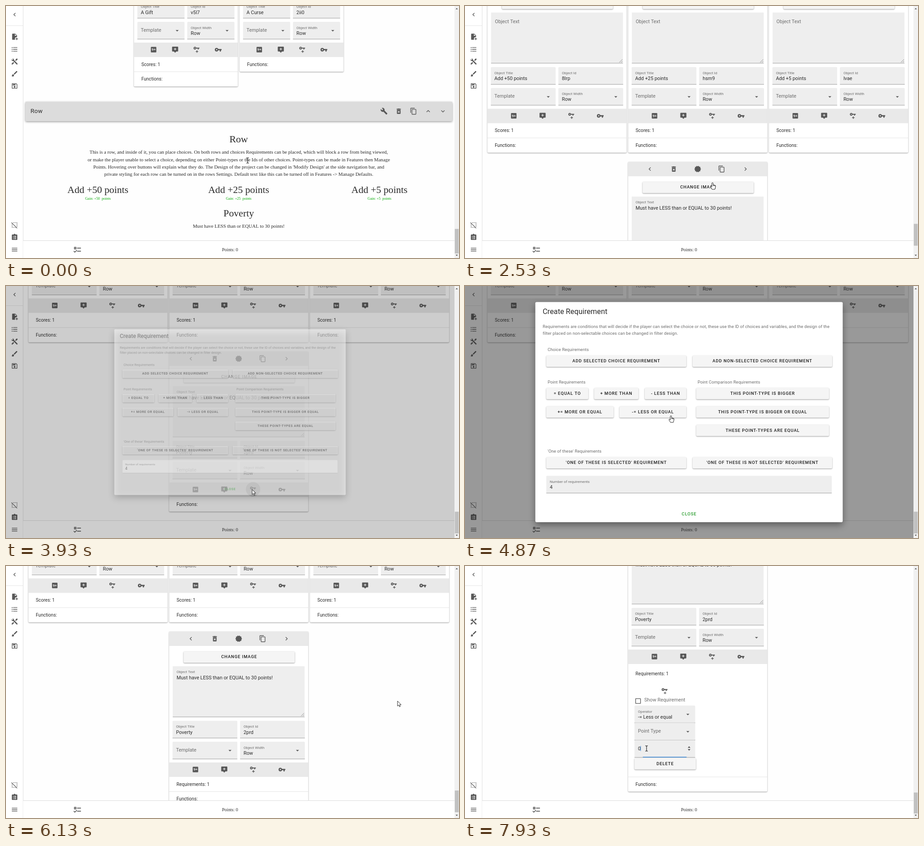
An HTML page with a canvas for the animation above (8 s loop, 1003 by 558 pixels).

```html
<!DOCTYPE html>
<html lang="en">
<head>
<meta charset="utf-8">
<title>Row editor</title>
<style>
html, body { margin: 0; width: 100%; height: 100%; overflow: hidden; background: #fff; }
canvas { display: block; width: 1003px; height: 558px; }
</style>
</head>
<body>
<canvas id="stage"></canvas>
<script>
const W = 1003, H = 558, LOOP = 8000;
const canvas = document.getElementById('stage');
const ctx = canvas.getContext('2d');
const dpr = window.devicePixelRatio || 1;
canvas.width = W * dpr;
canvas.height = H * dpr;

const SANS = 'Roboto, sans-serif';
const SERIF = '"Liberation Serif", serif';
const INK = '#2a2a2a', MUTED = '#6c6c6c', ICON_INK = '#585858';
const BAR = '#e9e9e9', FIELD = '#eeeeee', BLUE = '#1976d2';
// text sizes of the page at its zoom
const BODY = 10.83, PANEL = 10.15, SMALL = 8.12, BTN = 9.48;

const dot = y => `M4,${y - 1.5}a1.5,1.5 0 1,1 0,3a1.5,1.5 0 1,1 0,-3Z`;
const ICONS = {
  left: 'M15.41,16.58L10.83,12L15.41,7.41L14,6L8,12L14,18Z',
  right: 'M8.59,16.58L13.17,12L8.59,7.41L10,6L16,12L10,18Z',
  up: 'M7.41,15.41L12,10.83L16.59,15.41L18,14L12,8L6,14Z',
  down: 'M7.41,8.58L12,13.17L16.59,8.58L18,10L12,16L6,10Z',
  drop: 'M7,10L12,15L17,10Z',
  filePlus: 'M14,2H6C4.9,2 4,2.9 4,4V20C4,21.1 4.9,22 6,22H13.8C13.3,21.1 13,20 13,19C13,15.7 15.7,13 19,13L20,13.1V8L14,2M13,9V3.5L18.5,9H13M18,15V18H15V20H18V23H20V20H23V18H20V15Z',
  list: 'M7,5H21V7H7ZM7,11H21V13H7ZM7,17H21V19H7Z' + dot(6) + dot(12) + dot(18),
  tools: 'M21.7,20.3L20.3,21.7A1,1 0 0 1 18.9,21.7L7,9.85A4,4 0 0 1 2.2,4.7L4.76,7.24L7.24,4.76L4.7,2.2A4,4 0 0 1 9.85,7L21.7,18.9A1,1 0 0 1 21.7,20.3M2.3,18.9A1,1 0 0 0 2.3,20.3L3.7,21.7A1,1 0 0 0 5.1,21.7L10.6,16.25L7.76,13.4M20,2L16,4V6L13.8,8.2L15.8,10.2L18,8H20L22,4Z',
  brush: 'M20.7,4.6L19.4,3.3C19,2.9 18.35,2.9 18,3.3L9,12.25L11.75,15L20.7,6C21.1,5.65 21.1,5 20.7,4.6M7,14A3,3 0 0,0 4,17C4,18.3 2.84,19 2,19C2.9,20.2 4.5,21 6,21A4,4 0 0,0 10,17A3,3 0 0,0 7,14Z',
  save: 'M17,3H5C3.9,3 3,3.9 3,5V19C3,20.1 3.9,21 5,21H19C20.1,21 21,20.1 21,19V7L17,3M19,19H5V5H16.2L19,7.8V19M12,12a3,3 0 1,0 0,6a3,3 0 1,0 0,-6M6,6H15V10H6Z',
  selectOff: 'M1,4.3L2.3,3L21,21.7L19.7,23ZM7,3H9V5H7ZM11,3H13V5H11ZM15,3H17V5H15ZM19,3H21V5H19ZM19,7H21V9H19ZM19,11H21V13H19ZM19,15H21V17H19ZM3,7H5V9H3ZM3,11H5V13H3ZM3,15H5V17H3ZM3,19H5V21H3ZM7,19H9V21H7ZM11,19H13V21H11ZM15,19H17V21H15Z',
  clipboard: 'M19,3H14.8C14.4,1.8 13.3,1 12,1C10.7,1 9.6,1.8 9.2,3H5A2,2 0 0,0 3,5V19A2,2 0 0,0 5,21H19A2,2 0 0,0 21,19V5A2,2 0 0,0 19,3M7,8H9V10H7ZM11,8H17V10H11ZM7,12H9V14H7ZM11,12H17V14H11ZM7,16H9V18H7ZM11,16H17V18H11Z',
  menu: 'M3,6H21V8H3ZM3,11H21V13H3ZM3,16H21V18H3Z',
  checks: 'M3,5H9V11H3ZM5,7V9H7V7ZM11,7H21V9H11ZM11,15H21V17H11ZM5,20L1.5,16.5L2.9,15.1L5,17.2L9.6,12.6L11,14Z',
  wrench: 'M22.7,19L13.6,9.9C14.5,7.6 14,4.9 12.1,3C10.1,1 7.1,0.6 4.7,1.7L9,6L6,9L1.6,4.7C0.4,7.1 0.9,10.1 2.9,12.1C4.8,14 7.5,14.5 9.8,13.6L18.9,22.7C19.3,23.1 19.9,23.1 20.3,22.7L22.6,20.4C23.1,20 23.1,19.3 22.7,19Z',
  trash: 'M6,19A2,2 0 0,0 8,21H16A2,2 0 0,0 18,19V7H6V19M8.5,11.9L9.9,10.5L12,12.6L14.1,10.5L15.5,11.9L13.4,14L15.5,16.1L14.1,17.5L12,15.4L9.9,17.5L8.5,16.1L10.6,14ZM15.5,4L14.5,3H9.5L8.5,4H5V6H19V4Z',
  copy: 'M19,21H8V7H19M19,5H8A2,2 0 0,0 6,7V21A2,2 0 0,0 8,23H19A2,2 0 0,0 21,21V7A2,2 0 0,0 19,5M16,1H4A2,2 0 0,0 2,3V17H4V3H16V1Z',
  badge: 'M23,12L20.6,9.2L20.9,5.5L17.3,4.7L15.4,1.5L12,3L8.6,1.5L6.7,4.7L3.1,5.5L3.4,9.2L1,12L3.4,14.8L3.1,18.5L6.7,19.3L8.6,22.5L12,21L15.4,22.5L17.3,19.3L20.9,18.5L20.6,14.8Z',
  square: 'M5,3H19A2,2 0 0,1 21,5V19A2,2 0 0,1 19,21H5A2,2 0 0,1 3,19V5A2,2 0 0,1 5,3Z',
  tip: 'M4,2H20A2,2 0 0 1 22,4V16A2,2 0 0 1 20,18H16L12,22L8,18H4A2,2 0 0 1 2,16V4A2,2 0 0 1 4,2M11,6V9H8V11H11V14H13V11H16V9H13V6Z',
  key: 'M7,10a2,2 0 1,0 0,4a2,2 0 1,0 0,-4M12.65,10C11.8,7.7 9.6,6 7,6A6,6 0 0,0 7,18C9.6,18 11.8,16.3 12.65,14H17V18H21V14H23V10Z',
  keyPlus: 'M6.5,2.5A4.5,4.5 0 1,0 10.7,8.5H15.5V11.5H18.5V8.5H21V5.5H10.7A4.5,4.5 0 0,0 6.5,2.5M6.5,5.3a1.7,1.7 0 1,1 0,3.4a1.7,1.7 0 1,1 0,-3.4M12,14H14V17H17V19H14V22H12V19H9V17H12Z',
  check: 'M19,3H5C3.9,3 3,3.9 3,5V19A2,2 0 0,0 5,21H19A2,2 0 0,0 21,19V5C21,3.9 20.1,3 19,3M19,5V19H5V5Z'
};
for (const k in ICONS) ICONS[k] = new Path2D(ICONS[k]);

const clamp = v => Math.max(0, Math.min(1, v));
const ramp = (t, a, b) => clamp((t - a) / (b - a));
const ease = p => p * p * (3 - 2 * p);

function text(s, x, y, size, color = INK, opt = {}) {
  ctx.font = `${opt.weight || 400} ${size}px ${opt.font || SANS}`;
  ctx.letterSpacing = (opt.gap || 0) * size + 'px';
  ctx.textAlign = opt.align || 'left';
  ctx.textBaseline = 'middle';
  ctx.fillStyle = color;
  ctx.fillText(s, x, y);
}
const serif = (s, x, y, size, color) => text(s, x, y, size, color, { font: SERIF, align: 'center' });

function rect(x, y, w, h, color) {
  ctx.fillStyle = color;
  ctx.fillRect(x, y, w, h);
}

function box(x, y, w, h, fill, r = 2, lift = 1) {
  ctx.save();
  ctx.shadowColor = 'rgba(0,0,0,.4)';
  ctx.shadowBlur = 2.5 * lift * dpr;
  ctx.shadowOffsetY = lift * dpr;
  ctx.fillStyle = fill;
  ctx.beginPath();
  ctx.roundRect(x, y, w, h, r);
  ctx.fill();
  ctx.restore();
}

function icon(name, x, y, size = 16.25, color = ICON_INK) {
  ctx.save();
  ctx.translate(x - size / 2, y - size / 2);
  ctx.scale(size / 24, size / 24);
  ctx.fillStyle = color;
  ctx.fill(ICONS[name], 'evenodd');
  ctx.restore();
}

function circle(x, y, r, color) {
  ctx.fillStyle = color;
  ctx.beginPath();
  ctx.arc(x, y, r, 0, 7);
  ctx.fill();
}

function button(label, x0, x1, y, fill = '#f5f5f5') {
  box(x0, y - 12.5, x1 - x0, 25, fill);
  text(label, (x0 + x1) / 2, y, BTN, '#1c1c1c', { weight: 500, gap: 0.0893, align: 'center' });
}

function field(x, y, w, label, value, arrow) {
  ctx.fillStyle = FIELD;
  ctx.beginPath();
  ctx.roundRect(x, y, w, 38.5, [2, 2, 0, 0]);
  ctx.fill();
  rect(x, y + 37.8, w, 0.9, '#949494');
  const tx = x + 7.8;
  if (label && value) {
    text(label, tx, y + 13.3, SMALL, MUTED);
    text(value, tx, y + 25.7, BODY);
  } else {
    text(label || value, tx, y + 18.8, BODY, label ? MUTED : INK);
  }
  if (arrow) icon('drop', x + w - 16.3, y + 19.5);
}

function area(x, y, w, h, label, lines) {
  rect(x, y, w, h, FIELD);
  rect(x, y + h - 0.8, w, 0.9, '#949494');
  if (lines.length) {
    text(label, x + 8.5, y + 13, SMALL, MUTED);
    lines.forEach((s, i) => text(s, x + 8.5, y + 26 + i * 15, BODY));
  } else {
    text(label, x + 8.5, y + 20, BODY, MUTED);
  }
  ctx.strokeStyle = '#777';
  ctx.lineWidth = 0.8;
  ctx.beginPath();
  for (const d of [3, 7]) {
    ctx.moveTo(x + w - d - 1, y + h - 2);
    ctx.lineTo(x + w - 1, y + h - d - 2);
  }
  ctx.stroke();
}

function requirement(x, y, t) {
  icon('keyPlus', x + 81, y + 17);
  icon('check', x + 22, y + 39);
  text('Show Requirement', x + 35.7, y + 37, BODY, MUTED);
  field(x + 14, y + 49, 134.5, 'Operator', '-= Less or equal', true);
  field(x + 14, y + 87.3, 134.5, 'Point Type', '', true);
  field(x + 14, y + 125.6, 134.5, '', '0');
  if (t >= 7700) {
    ctx.fillStyle = '#444';
    for (const s of [-1, 1]) {
      const cy = y + 144 + s * 1.5;
      ctx.beginPath();
      ctx.moveTo(x + 132, cy);
      ctx.lineTo(x + 138, cy);
      ctx.lineTo(x + 135, cy + s * 3.2);
      ctx.fill();
    }
  }
  const half = 67 * ease(ramp(t, 7820, 7990));
  rect(x + 81 - half, y + 162.6, half * 2, 1.3, BLUE);
  if (t >= 7860) rect(x + 27.2, y + 138.5, 0.9, 11, BLUE);
  button('DELETE', x + 14, x + 150, y + 178);
}

// panels: [label, openness]
function card(x, y, w, d, t) {
  const sizes = d.panels.map(([, open = 0]) => [32.6 + 10.4 * open, 207 * open]);
  const height = 322 + sizes.reduce((sum, [a, b]) => sum + a + b, 0);
  const mid = x + w / 2, fw = (w - 21) / 2, f1 = x + 7.5, f2 = x + 13.5 + fw;
  box(x, y, w, height, '#fff');
  rect(x, y, w, 32, BAR);
  ['left', 'trash', 'badge', 'copy', 'right'].forEach((n, i) => icon(n, mid + (i - 2) * w * 0.172, y + 16));
  button('CHANGE IMAGE', x + 32, x + w - 30, y + 56.7);
  area(x + 8, y + 77, w - 16, 112.5, 'Object Text', d.text ? [d.text] : []);
  field(f1, y + 197.7, fw, 'Object Title', d.title);
  field(f2, y + 197.7, fw, 'Object Id', d.id);
  field(f1, y + 244, fw, 'Template', '', true);
  field(f2, y + 244, fw, 'Object Width', 'Row', true);
  rect(x, y + 290, w, 32, BAR);
  ['square', 'tip', 'keyPlus', 'key'].forEach((n, i) => icon(n, mid + (i - 1.5) * w * 0.2073, y + 305.7));
  text('9+', mid - 1.5 * w * 0.2073, y + 306, 8, BAR, { weight: 700, align: 'center' });

  let py = y + 322;
  d.panels.forEach(([label], i) => {
    const [head, body] = sizes[i];
    if (i) rect(x, py - 0.4, w, 0.8, '#dedede');
    text(label, x + 16.4, py + head / 2 + 0.3, PANEL);
    if (body) {
      ctx.save();
      ctx.beginPath();
      ctx.rect(x, py + head, w, body);
      ctx.clip();
      requirement(x, py + head, t);
      ctx.restore();
    }
    py += head + body;
  });
}

const INTRO = [
  'This is a row, and inside of it, you can place choices. On both rows and choices Requirements can be placed, which will block a row from being viewed,',
  'or make the player unable to select a choice, depending on either Point-types or the Ids of other choices. Point-types can be made in Features then Manage',
  "Points. Hovering over buttons will explain what they do. The Design of the project can be changed in 'Modify Design' at the side navigation bar, and",
  'private styling for each row can be turned on in the rows Settings. Default text like this can be turned off in Features -> Manage Defaults.'
];
const LIMIT = 'Must have LESS than or EQUAL to 30 points!';
const SCORED = [['Scores: 1'], ['Functions:']];
const PLAIN = [['Functions:']];
const GAINS = [['50', '8lrp'], ['25', 'hsm9'], ['5', 'lvae']];

function rowView() {
  serif('Row', 515.3, 296, 21.66);
  INTRO.forEach((s, i) => serif(s, 515.3, 324.5 + i * 16.3, BODY));
  GAINS.forEach(([n], i) => {
    const x = 203.5 + i * 311.7;
    serif(`Add +${n} points`, x, 408, 21.66);
    serif(`Gain: +${n}\u00a0 points`, x, 427.3, SMALL, '#00a800');
  });
  serif('Poverty', 515.3, 460, 21.66);
  serif(LIMIT, 515.3, 488, BODY);
}

function rowEdit(t) {
  button('CHANGE IMAGE', 82, 325, 278);
  field(57.5, 302, 292, 'Row Title', 'Row');
  area(369, 265, 604, 112.5, 'Row Text', INTRO.map(s => s.slice(0, 110)));
  const top = 437.5;
  GAINS.forEach(([n, id], i) =>
    card(49.7 + i * 311.7, top, 308, { title: `Add +${n} points`, id, panels: SCORED }, t));
  const panels = t < 5200 ? PLAIN : [['Requirements: 1', expansion(t)], ['Functions:']];
  card(361.2, top + 407.5, 308, { title: 'Poverty', id: '2prd', text: LIMIT, panels }, t);
}

const expansion = t => ease(ramp(t, 6815, 7120));
const scrolled = t => 500 * ease(ramp(t, 1890, 2530)) + 200 * ease(ramp(t, 2650, 3130))
  + 33 * ease(ramp(t, 6200, 6500)) + 217 * ease(ramp(t, 7080, 7500));

function page(t) {
  ctx.save();
  ctx.translate(0, -scrolled(t));
  card(283.3, -209, 230, { title: 'A Gift', id: 'v5l7', panels: SCORED }, t);
  card(517.3, -209, 230, { title: 'A Curse', id: '2ii0', panels: PLAIN }, t);
  box(43, 212, 945, 43, '#dcdcdc', 2, 1.6);
  text('Row', 54.3, 233.5, 13.54, INK, { gap: 0.0125 });
  if (t >= 1450 && t < 1800) circle(837, 233, 13 * ease(ramp(t, 1430, 1560)), 'rgba(0,0,0,.1)');
  ['wrench', 'trash', 'copy', 'up', 'down'].forEach((n, i) => icon(n, 837 + i * 32.6, 233));
  t < 1870 ? rowView() : rowEdit(t);
  ctx.restore();
  if (t >= 3530 && t < 4200) circle(547, 450, 16 * ease(ramp(t, 3480, 3700)), 'rgba(0,0,0,.14)');
}

function chrome() {
  rect(0, 0, 38, H, '#fff');
  rect(37.5, 0, 1, H, '#dddddd');
  rect(0, 43, 38, 0.8, '#e0e0e0');
  const side = { left: 19, filePlus: 68, list: 96, tools: 123, brush: 150, save: 177, selectOff: 485, clipboard: 512, menu: 539.5 };
  for (const n in side) icon(n, 19, side[n]);
  rect(38, 519.5, 955, 39, '#fff');
  rect(38, 519, 955, 1, '#dcdcdc');
  icon('checks', 158.3, 539.5, 20.3);
  serif('Points: 0', 496, 540, PANEL);
}

function scrollbar(t) {
  const total = t < 1870 ? 5518 : 6218 + (t < 5200 ? 0 : 33) + 217 * expansion(t);
  const top = 10 + (4960 + scrolled(t)) / total * 538;
  rect(993, 0, 10, H, '#f1f1f1');
  rect(993.7, top, 8.6, H / total * 538, '#c1c1c1');
  ctx.fillStyle = '#555';
  for (const [y, s] of [[4.5, 1], [553.5, -1]]) {
    ctx.beginPath();
    ctx.moveTo(998, y);
    ctx.lineTo(1000.5, y + 2.8 * s);
    ctx.lineTo(995.5, y + 2.8 * s);
    ctx.fill();
  }
}

function dialog(p) {
  if (p <= 0) return;
  const s = 0.5 + p / 2;
  const label = (str, x, y) => text(str, x, y, BTN, MUTED, { gap: 0.0071 });
  ctx.save();
  ctx.globalAlpha = p;
  ctx.translate(496, 279);
  ctx.scale(s, s);
  ctx.translate(-496, -279);
  box(155.7, 35.5, 680.6, 487.5, '#fff', 3, 6);
  text('Create Requirement', 172, 57, 16.25);
  label('Requirements are conditions that will decide if the player can select the choice or not, these use the ID of choices and variables, and the design of the', 172, 90.3);
  label('filter placed on non-selectable choices can be changed in filter design.', 172, 104.8);
  label('Choice Requirements', 183, 141.3);
  button('ADD SELECTED CHOICE REQUIREMENT', 180, 490, 166.5);
  button('ADD NON-SELECTED CHOICE REQUIREMENT', 504, 813, 166.5);
  label('Point Requirements', 183, 213);
  label('Point Comparison Requirements', 515, 213);
  button('= EQUAL TO', 180, 273, 238.3);
  button('+ MORE THAN', 286, 384, 238.3);
  button('- LESS THAN', 398, 490, 238.3);
  button('+= MORE OR EQUAL', 180, 329, 279);
  button('-= LESS OR EQUAL', 342, 490, 279);
  button('THIS POINT-TYPE IS BIGGER', 512, 806, 238.3);
  button('THIS POINT-TYPE IS BIGGER OR EQUAL', 512, 806, 279);
  button('THESE POINT-TYPES ARE EQUAL', 512, 806, 319.8);
  label("'One of these' Requirements", 183, 366.5);
  button("'ONE OF THESE IS SELECTED' REQUIREMENT", 180, 490, 391.5);
  button("'ONE OF THESE IS NOT SELECTED' REQUIREMENT", 504, 813, 391.5);
  field(180, 420.3, 632, 'Number of requirements', '4');
  text('CLOSE', 496.3, 505.7, BTN, '#259b2a', { weight: 500, gap: 0.0893, align: 'center' });
  ctx.restore();
}

function modal(t) {
  const shade = ease(ramp(t, 3825, 4040)) * (1 - ease(ramp(t, 5850, 6070)));
  if (shade > 0) rect(0, 0, 993, H, `rgba(33,33,33,${0.46 * shade})`);
  dialog(ease(ramp(t, 3800, 4060)) * (1 - ease(ramp(t, 5710, 5900))));
}

// pointer stops: time, x, y
const PATH = [
  [0, 535, 342], [570, 535, 342], [1390, 834, 232], [1530, 834, 232], [1730, 704, 316],
  [1870, 704, 316], [2500, 548, 391], [2640, 548, 391], [3470, 545, 450.5], [4220, 545, 450.5],
  [4860, 456, 287], [5140, 456, 287], [5720, 879, 294], [6050, 879, 294], [6780, 525, 441],
  [6990, 525, 441], [7660, 402, 404], [8000, 402, 404]
];
const KINDS = [
  [0, 'beam'], [740, 'arrow'], [1330, 'hand'], [1570, 'arrow'], [2440, 'hand'], [2690, 'arrow'],
  [3400, 'hand'], [3830, 'arrow'], [4760, 'hand'], [5230, 'arrow'], [6720, 'hand'], [7080, 'arrow'], [7560, 'beam']
];
const SHAPES = {
  arrow: new Path2D('M0,0V11.2L2.6,8.8L4.4,12.8L6.2,12L4.5,8.2H8Z'),
  hand: new Path2D('M-1.4,1Q0,-0.8 1.4,1V5L5.4,5.8Q7,6.2 6.9,8L6,12.2L5.2,15H-1L-4.4,9.6Q-4.6,7.6 -3,8.2L-1.4,9.8Z'),
  beam: new Path2D('M-2.8,-6Q-0.4,-6 0,-5Q0.4,-6 2.8,-6M0,-5V5M-2.8,6Q-0.4,6 0,5Q0.4,6 2.8,6')
};

function pointer(t) {
  let i = 1;
  while (i < PATH.length - 1 && PATH[i][0] < t) i++;
  const [t0, x0, y0] = PATH[i - 1], [t1, x1, y1] = PATH[i];
  const p = ease(ramp(t, t0, t1));
  const kind = KINDS.filter(k => k[0] <= t).pop()[1];
  ctx.save();
  ctx.translate(x0 + (x1 - x0) * p, y0 + (y1 - y0) * p);
  ctx.strokeStyle = '#111';
  ctx.lineWidth = kind === 'beam' ? 1.1 : 0.9;
  if (kind !== 'beam') {
    ctx.fillStyle = '#fff';
    ctx.fill(SHAPES[kind]);
  }
  ctx.stroke(SHAPES[kind]);
  if (kind === 'hand') ctx.stroke(new Path2D('M1.4,5V7.5M3.3,5.5V7.7M5.2,6V8'));
  ctx.restore();
}

function draw(t) {
  ctx.setTransform(dpr, 0, 0, dpr, 0, 0);
  rect(0, 0, W, H, '#fefefe');
  page(t);
  chrome();
  modal(t);
  scrollbar(t);
  pointer(t);
}

const start = performance.now();
function tick() {
  draw((performance.now() - start) % LOOP);
  requestAnimationFrame(tick);
}
tick();
</script>
</body>
</html>
```
